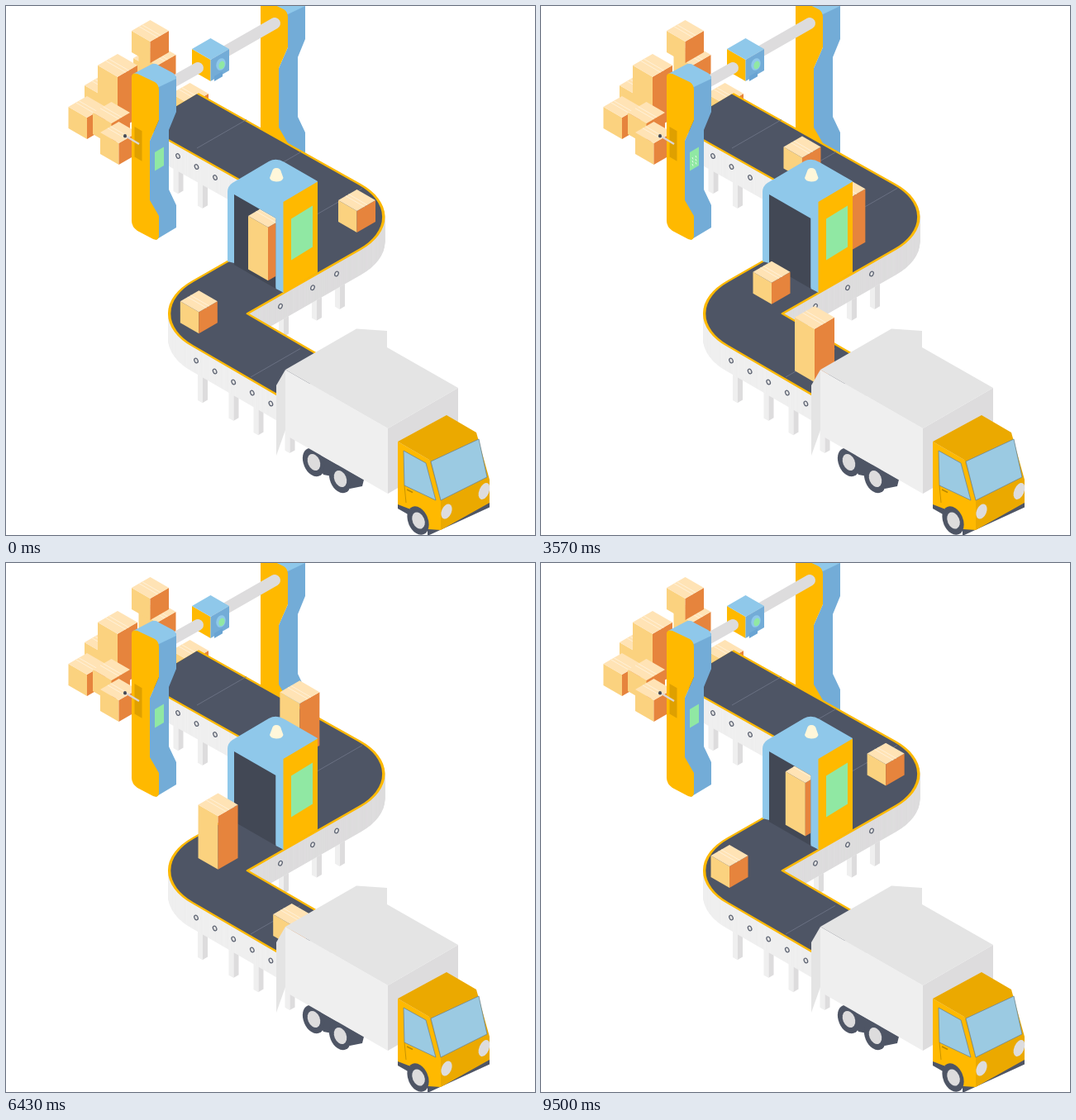
Recreate the animation shown at these times as an HTML page with a canvas. Size 640x640 px, loop 9570 ms.

```html
<!DOCTYPE html>
<html lang="en">
<head>
<meta charset="utf-8">
<title>Parcel line</title>
<style>
  html, body { margin: 0; width: 100%; height: 100%; overflow: hidden; background: #fff; }
  canvas { display: block; width: 640px; height: 640px; }
</style>
</head>
<body>
<canvas id="stage" width="640" height="640"></canvas>
<script>
const ctx = document.getElementById('stage').getContext('2d');
const LOOP = 9570, FPS = 14, SLOPE = 0.577;
const C = {
  yellow: '#ffb900', amber: '#eba900', slot: '#dfa000',
  sky: '#8fc8ea', blue: '#73acd7', glass: '#9bcae2', green: '#90e8a3',
  dark: '#4e5565', inside: '#424855',
  pale: '#efefef', mid: '#e4e4e4', grey: '#dddcdd', outline: '#6f8791',
  boxTop: '#ffe3b5', boxLeft: '#fbd27f', boxRight: '#e6843d', tape: '#fff1d8'
};

function poly(color, ...p) {
  ctx.beginPath();
  for (let i = 0; i < p.length; i += 2) ctx.lineTo(p[i], p[i + 1]);
  ctx.closePath();
  ctx.fillStyle = color;
  ctx.fill();
}
function shape(color, d) {
  ctx.fillStyle = color;
  ctx.fill(new Path2D(d));
}
function line(color, width, x1, y1, x2, y2) {
  ctx.beginPath();
  ctx.moveTo(x1, y1);
  ctx.lineTo(x2, y2);
  ctx.strokeStyle = color;
  ctx.lineWidth = width;
  ctx.stroke();
}
function oval(color, x, y, rx, ry, turn = 0) {
  ctx.beginPath();
  ctx.ellipse(x, y, rx, ry, turn, 0, Math.PI * 2);
  ctx.fillStyle = color;
  ctx.fill();
}
// Upright wall starting at its top left corner
function wall(color, x, y, w, h, slope) {
  poly(color, x, y, x + w, y + w * slope, x + w, y + w * slope + h, x, y + h);
}
// x, y is the rear corner of the top face
function cube(x, y, w, h, top, left, right) {
  const d = w * SLOPE;
  wall(left, x - w, y + d, w, h, SLOPE);
  wall(right, x, y + 2 * d, w, h, -SLOPE);
  poly(top, x, y, x + w, y + d, x, y + 2 * d, x - w, y + d);
}
function parcel(x, y, tall) {
  const w = tall ? 24 : 22.5, d = w * SLOPE;
  cube(x, y, w, tall ? 64.5 : 26, C.boxTop, C.boxLeft, C.boxRight);
  for (const k of [0.4, 0.56])
    line(C.tape, 1, x - w + w * k, y + d - d * k, x + w * k, y + 2 * d - d * k);
}

// Parcels run at a steady pace on each of the three stretches between bends
const SPEED = { in: 0.105, out: 0.076 };
const SMALL = { tall: false, a: { x: 424.5, y: 222 }, b: { x: 226.5, y: 340.2 }, slopeIn: 0.594, slopeOut: 0.603 };
const TALL = { tall: true, a: { x: 418.5, y: 175.5 }, b: { x: 228.3, y: 296.5 }, slopeIn: 0.5255, slopeOut: 0.647 };
const RUNS = [
  { kind: SMALL, bend1: 0, bend2: 4860 },
  { kind: TALL, bend1: 2290, bend2: 7150 },
  { kind: SMALL, bend1: 4605, bend2: 9480 },
  { kind: TALL, bend1: -2540, bend2: 2220 }
];

function locate({ kind, bend1, bend2 }, t) {
  const { tall, a, b } = kind;
  if (t < bend1) {
    const dx = (t - bend1) * SPEED.in;
    return { tall, leg: 1, x: a.x + dx, y: a.y + dx * kind.slopeIn };
  }
  if (t < bend2) {
    const k = (t - bend1) / (bend2 - bend1);
    return { tall, leg: 2, x: a.x + (b.x - a.x) * k, y: a.y + (b.y - a.y) * k };
  }
  const dx = (t - bend2) * SPEED.out;
  return { tall, leg: 3, x: b.x + dx, y: b.y + dx * kind.slopeOut };
}
function parcelsAt(t) {
  const list = [];
  for (const run of RUNS)
    for (const time of [t - LOOP, t, t + LOOP])
      if (time > run.bend1 - 2350 && time < run.bend2 + 2350) list.push(locate(run, time));
  return list.sort((p, q) => p.y - q.y);
}
const drawAll = list => list.forEach(p => parcel(p.x, p.y, p.tall));

// The belt is one wide stroke on the isometric floor
const COS = 0.866, SIN = 0.5;
function floorPoint(x, y) {
  return [(x / COS + y / SIN) / 2, (y / SIN - x / COS) / 2];
}
function beltStroke(color, width, drop = 0) {
  const bend1 = floorPoint(430, 255), bend2 = floorPoint(225, 372);
  ctx.save();
  ctx.transform(COS, SIN, -COS, SIN, 0, drop);
  ctx.beginPath();
  ctx.moveTo(...floorPoint(199, 125.5));
  ctx.arcTo(...bend1, ...bend2, 39);
  ctx.arcTo(...bend2, ...floorPoint(370, 456), 39);
  ctx.lineTo(...floorPoint(370, 456));
  ctx.strokeStyle = color;
  ctx.lineWidth = width;
  ctx.stroke();
  ctx.restore();
}
function skirt(color) {
  for (let drop = 30; drop > 0; drop--) beltStroke(color, 80, drop);
}
function support(x, bottom) {
  wall(C.pale, x - 6, bottom - 55, 6, 52, SLOPE);
  wall(C.grey, x, bottom - 52, 6, 52, -SLOPE);
}
function bolt(x, y, turn) {
  oval('#5b6170', x, y, 2.7, 3.6, turn);
  oval(C.mid, x, y, 1.5, 2.4, turn);
}
function belt() {
  for (const x of [208.5, 238]) support(x, 227 + (x - 208.5) * 0.6);
  for (const x of [336, 376, 404]) support(x, 400 - (x - 336) * 0.49);
  for (const x of [238, 275.5, 305.5, 343.5]) support(x, 480 + (x - 238) * SLOPE);

  skirt(C.pale);
  ctx.save();
  ctx.beginPath();
  ctx.rect(292, 240, 180, 180);
  ctx.clip();
  skirt(C.grey);
  ctx.restore();
  beltStroke(C.yellow, 80);
  beltStroke(C.dark, 74.5);

  for (const [x, y] of [[231, 172], [297, 211], [371, 255], [296, 449]])
    line('#70778a', 0.8, x, y, x + 60, y - 34.5);
  for (let i = 0; i < 3; i++) bolt(208 + i * 22.5, 181.5 + i * 13, -0.4);
  for (let i = 0; i < 5; i++) bolt(230 + i * 22.6, 429 + i * 13, -0.4);
  for (const x of [400, 371, 332]) bolt(x, 324 + (400 - x) * SLOPE, 0.4);
}

function pile() {
  const spots = [[183, 46], [174.5, 17], [117.5, 83], [135, 58, true], [98, 109], [127.5, 116], [136.5, 140]];
  for (const [x, y, tall] of spots) parcel(x, y, tall);
}

function pillar() {
  shape(C.blue, 'M183 96 L206 85 V128 L197 150 V222 L206 241 V268 L181 283 L174 236 V163 L185 138 Z');
  shape(C.sky, 'M154 82 L175 71 Q180 68 185 72 L202 81 Q206 84 206 88 L185 98 Z');
  shape(C.yellow, 'M152 86 Q152 80 159 82 L180 92 Q185 95 185 102 V138 L174 163 V235 L185 254 V277 Q185 285 178 282 L159 272 Q152 267 152 260 Z');
}
function farPillar() {
  ctx.save();
  ctx.translate(156, -88);
  pillar();
  ctx.restore();
}
function nearPillar(showText) {
  pillar();
  wall(C.slot, 155.5, 146, 9, 36.5, SLOPE);
  line('#dcd5d2', 2.4, 146, 158, 161, 167);
  oval('#444a57', 144, 157.3, 2, 2.2);
  wall(C.green, 180, 177, 11, 22.5, -0.6);
  if (!showText) return;
  for (let i = 0; i < 6; i++) {
    const x = 183 + i % 2 * 4, y = 183 + i * 2 - i % 2 * 4;
    line('#e7fbe9', 1, x, y, x + 1, y + 2.5);
  }
}

function rod(x1, y1, x2, y2) {
  ctx.lineCap = 'round';
  line(C.grey, 14, x1, y1, x2, y2);
  ctx.lineCap = 'butt';
}
function scannerHead() {
  rod(255, 61, 325, 21);
  cube(247.5, 39, 22.5, 26, C.sky, C.yellow, C.blue);
  wall('#69a4d3', 252, 85, 10, 6, -SLOPE);
  oval(C.sky, 260, 70.5, 5.5, 7.5, 0.3);
  oval(C.green, 261, 71.5, 3.5, 5, 0.3);
  rod(200, 93, 232, 75);
}

function beam() {
  ctx.save();
  ctx.beginPath();
  ctx.moveTo(252, 89);
  for (const corner of [[264, 87], [308, 146], [257, 181], [199, 148]]) ctx.lineTo(...corner);
  ctx.clip();
  ctx.fillStyle = 'rgba(135,195,220,.25)';
  ctx.fillRect(190, 80, 125, 110);
  ctx.fillStyle = 'rgba(225,241,249,.2)';
  for (let y = 86; y < 184; y += 3)
    for (let x = 196 + y % 2 * 1.5; x < 310; x += 3) ctx.fillRect(x, y, 1, 1);
  ctx.restore();
}

function machine(inner) {
  shape(C.sky, 'M268 225 Q268 218 274 214 L318 188 Q327 183 337 189 L377 212 L345 300 L336 347 L326 340 L276 311 L268 309 Z');
  const doorway = new Path2D('M276 228 L326.5 257 V342 L276 313 Z');
  ctx.fillStyle = C.inside;
  ctx.fill(doorway);
  ctx.save();
  ctx.clip(doorway);
  drawAll(inner);
  ctx.restore();
  wall(C.sky, 326.5, 250, 10, 92, 0.5);
  wall(C.yellow, 335.5, 237, 41.5, 110, -0.59);
  wall(C.green, 345, 257.5, 26, 50, -0.62);
  shape('#fff7da', 'M322 200 Q323 196 327 196 Q332 196 333 201 L335.5 208 Q334 212.5 327 212.5 Q320 212 319 208 Z');
}

function wheel(x, y) {
  oval(C.dark, x, y, 12, 18, -0.4);
  oval(C.grey, x + 0.5, y, 7.2, 10.5, -0.4);
}
function pane(...p) {
  poly(C.glass, ...p);
  ctx.strokeStyle = C.outline;
  ctx.lineWidth = 0.8;
  ctx.stroke();
}
function truck() {
  poly(C.mid, 338, 440, 327, 459, 327, 544, 338, 513);
  poly(C.dark, 366, 535, 433, 573, 431, 581, 416, 584, 400, 570, 384, 567);
  wheel(372, 552);
  wheel(404, 572);
  wall(C.pale, 338, 440, 124, 79, 0.573);
  wall(C.grey, 462, 511, 85, 79, -SLOPE);
  poly(C.mid, 338, 440, 424, 390.5, 461, 393, 461, 413, 547, 462, 462, 511);

  wall(C.dark, 474, 600, 14, 8, SLOPE);
  wall(C.dark, 510, 633, 75, 8, -0.46);
  poly(C.amber, 474, 527, 533, 495, 569, 516, 585, 573, 585, 601, 526, 634, 512, 549);
  poly(C.yellow, 474, 527, 512, 549, 526, 600, 526, 634, 511, 633, 503, 611, 487, 608, 474, 603);
  pane(514, 551, 572, 524, 582, 570, 526, 598);
  pane(481, 538, 508, 553, 520, 598, 482, 580);
  line('#b98900', 0.8, 482, 580, 484, 601);
  line('#b98900', 1.5, 485, 585, 492, 588.5);
  wheel(498.5, 622.5);
  oval(C.grey, 533, 611.5, 6, 9.5, 0.4);
  oval(C.grey, 578.5, 587, 6, 10.5, 0.4);
}

function draw(t) {
  const all = parcelsAt(t);
  const isInner = p => p.leg === 2 && p.x > 302;
  const passing = (from, to) => all.some(p => p.leg === 1 && p.x > from && p.x < to);

  ctx.fillStyle = '#fff';
  ctx.fillRect(0, 0, 640, 640);
  farPillar();
  parcel(222.5, 93, false);
  belt();
  drawAll(all.filter(p => p.leg === 1 || isInner(p)));
  pile();
  if (passing(256, 292)) beam();
  scannerHead();
  nearPillar(passing(292, 350));
  machine(all.filter(isInner));
  drawAll(all.filter(p => p.leg > 1 && !isInner(p)));
  truck();
}

const start = performance.now();
function tick() {
  const t = (performance.now() - start) % LOOP;
  draw(Math.floor((t + 6) * FPS / 1000) * 1000 / FPS % LOOP);
  requestAnimationFrame(tick);
}
tick();
</script>
</body>
</html>
```
